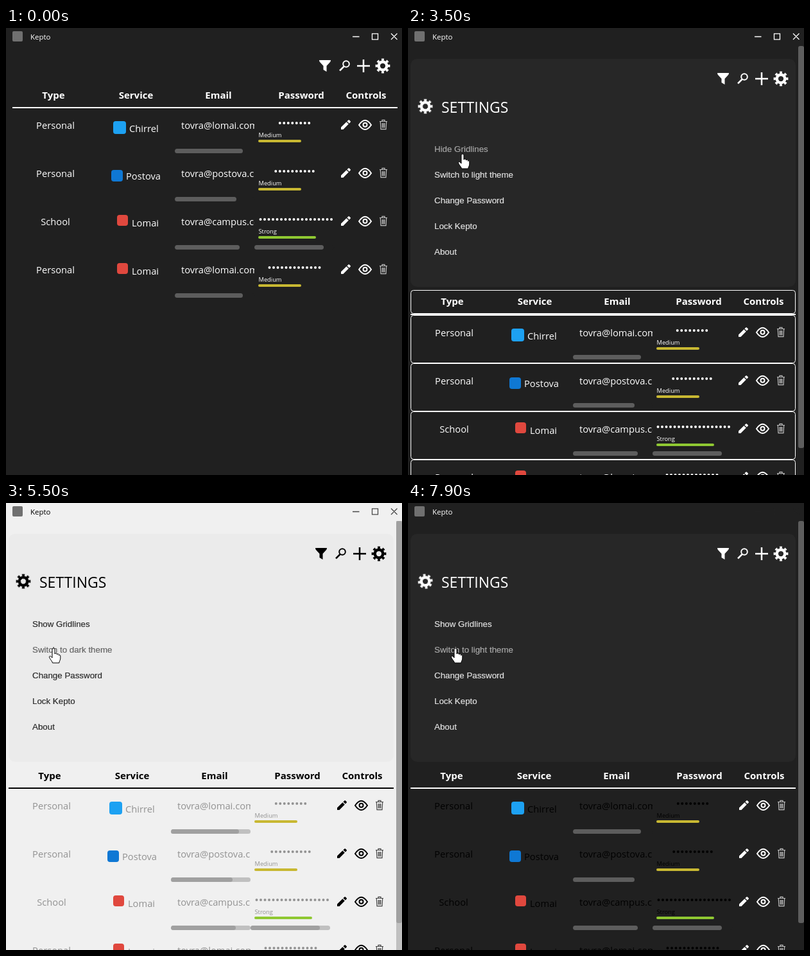
An HTML page for the animation above (8000 ms loop, 617 px wide and 696 px high).

```html
<!DOCTYPE html>
<html lang="en">
<head>
<meta charset="utf-8">
<title>Password manager</title>
<style>
@property --bg { syntax: "<color>"; inherits: true; initial-value: #202020; }
@property --panel { syntax: "<color>"; inherits: true; initial-value: #272727; }
@property --ink { syntax: "<color>"; inherits: true; initial-value: #fff; }
@property --menu { syntax: "<color>"; inherits: true; initial-value: #e2e2e2; }
@property --head { syntax: "<color>"; inherits: true; initial-value: #fff; }
@property --ctl { syntax: "<color>"; inherits: true; initial-value: #fff; }
@property --row { syntax: "<color>"; inherits: true; initial-value: #fff; }
@property --track { syntax: "<color>"; inherits: true; initial-value: #202020; }
@property --thumb { syntax: "<color>"; inherits: true; initial-value: #5d5d5d; }
@property --light { syntax: "<number>"; inherits: true; initial-value: 0; }
@property --grid { syntax: "<number>"; inherits: true; initial-value: 0; }

:root {
  animation: theme 8s linear infinite, head 8s linear infinite, ctl 8s linear infinite,
    row 8s linear infinite, bars 8s linear infinite, grid 8s linear infinite;
}
html, body { margin: 0; width: 100%; height: 100%; overflow: hidden; background: var(--bg); }
body > svg { display: block; }
text { font-family: "Open Sans", "Noto Sans", sans-serif; white-space: pre; }

/* theme colours: icons first, then headings, then nested text */
@keyframes theme {
  0%, 52.5% { --bg: #202020; --panel: #272727; --ink: #fff; --menu: #e2e2e2; }
  55%, 85% { --bg: #f0f0f0; --panel: #ebebeb; --ink: #000; --menu: #2c2c2c; }
  87.5%, 100% { --bg: #202020; --panel: #272727; --ink: #fff; --menu: #e2e2e2; }
}
@keyframes head {
  0%, 57.5% { --head: #fff; }
  62.5%, 90% { --head: #000; }
  95%, 100% { --head: #fff; }
}
@keyframes ctl {
  0%, 65.6% { --ctl: #fff; }
  70%, 98.1% { --ctl: #000; }
  100% { --ctl: #606060; }
}
@keyframes row {
  0%, 66.9% { --row: #fff; }
  71.25%, 100% { --row: #000; }
}
@keyframes bars {
  0%, 51.87% { --track: #202020; --thumb: #5d5d5d; --light: 0; }
  51.88%, 84.37% { --track: #c0c0c0; --thumb: #a0a0a0; --light: 1; }
  84.38%, 100% { --track: #202020; --thumb: #5d5d5d; --light: 0; }
}
@keyframes grid {
  0%, 21.87% { --grid: 0; }
  21.88%, 45% { --grid: 1; }
  45.01%, 100% { --grid: 0; }
}

/* settings panel opening */
.body { animation: slide 8s infinite; }
@keyframes slide {
  0%, 10% { transform: translate(6px, -320px); animation-timing-function: ease-out; }
  15.6%, 100% { transform: none; }
}
.tools { animation: tools 8s infinite; }
@keyframes tools {
  0%, 10% { transform: translate(6px, -20px); animation-timing-function: ease-out; }
  15.6%, 100% { transform: none; }
}
.panel { animation: show 8s linear infinite; }
@keyframes show {
  0%, 10% { opacity: 0; }
  14%, 100% { opacity: 1; }
}
.page { animation: page 8s linear infinite; }
@keyframes page {
  0%, 9.99% { opacity: 0; }
  10%, 100% { opacity: 1; }
}
.spin { animation: spin 4s linear infinite; }
@keyframes spin { to { transform: rotate(360deg); } }

/* menu entries */
.menu text { font: 13.333px "Liberation Sans", Arial, sans-serif; fill: var(--menu); stroke: var(--menu); stroke-width: .2px; }
.item { transform-box: fill-box; transform-origin: center; }
.one { animation: hover1 8s linear infinite, press1 8s linear infinite; }
.two { animation: hover2 8s linear infinite, press2 8s linear infinite; }
@keyframes hover1 {
  0%, 19% { opacity: 1; }
  19.8%, 28% { opacity: .68; }
  29%, 42% { opacity: 1; }
  42.8%, 47% { opacity: .68; }
  48.5%, 100% { opacity: 1; }
}
@keyframes hover2 {
  0%, 49% { opacity: 1; }
  50.5%, 100% { opacity: .7; }
}
@keyframes press1 {
  0%, 21.5% { transform: none; }
  22%, 22.5% { transform: scale(.95); }
  24.6%, 44.5% { transform: none; }
  45%, 45.5% { transform: scale(.95); }
  47.5%, 100% { transform: none; }
}
@keyframes press2 {
  0%, 51% { transform: none; }
  51.6%, 52.6% { transform: scale(.95); }
  54.8%, 83.8% { transform: none; }
  84.4%, 85.1% { transform: scale(.95); }
  87.5%, 100% { transform: none; }
}
.gridOn, .lines { opacity: var(--grid); }
.gridOff { opacity: calc(1 - var(--grid)); }
.lightOn { opacity: var(--light); }
.lightOff { opacity: calc(1 - var(--light)); }

/* table */
.title { font-size: 11.5px; fill: var(--head); }
.big { font-size: 23px; fill: var(--head); }
.th text { font-size: 15px; font-weight: 700; fill: var(--head); text-anchor: middle; }
.td { font-size: 14.7px; fill: var(--row); }
.small { font-size: 9.3px; fill: var(--row); }
.mid { text-anchor: middle; }
.dots { stroke: var(--row); stroke-width: 4; stroke-linecap: round; }
.track { fill: var(--track); }
.thumb { fill: var(--thumb); }
.rule { stroke: var(--ink); stroke-width: 2; transform: translateY(calc(var(--grid) * 2px)); }
.lines { fill: none; stroke: #fff; }
.headL { transform: translate(calc(var(--grid) * 1px), calc(var(--grid) * 1px)); }
.headR { transform: translate(calc(var(--grid) * -1px), calc(var(--grid) * 1px)); }
.left { transform: translate(calc(var(--grid) * 1px), calc(var(--grid) * 3px)); }
.cell { transform: translateY(calc(var(--grid) * 3px)); }
.right { transform: translate(calc(var(--grid) * -1px), calc(var(--grid) * 3px)); }
.scroll { transform: translateY(calc(var(--grid) * 1px)); }
.fill { fill: var(--ink); }
.line { fill: none; stroke: var(--ink); }
.win { fill: none; stroke: var(--ctl); stroke-width: 1.3; }

/* pointer */
.cursor { fill: #fff; stroke: #000; stroke-linejoin: round; animation: move 8s ease-in-out infinite; }
@keyframes move {
  0%, 1.2% { transform: translate(604px, 60px); }
  3.75%, 11% { transform: translate(594px, 61px); }
  20%, 21.5% { transform: translate(95px, 186px); }
  23.75%, 27.5% { transform: translate(94px, 184px); }
  32.5% { transform: translate(80px, 430px); }
  36% { transform: translate(146px, 500px); }
  39% { transform: translate(24px, 516px); }
  42.5% { transform: translate(86px, 200px); }
  43.75%, 46% { transform: translate(85px, 196px); }
  50.5%, 60% { transform: translate(73px, 226px); }
  65%, 100% { transform: translate(74px, 226px); }
}
.hand { animation: hand 8s step-end infinite; }
.arrow { animation: arrow 8s step-end infinite; }
@keyframes hand {
  0% { opacity: 0; }
  1.25% { opacity: 1; }
  11.6% { opacity: 0; }
  19% { opacity: 1; }
  29% { opacity: 0; }
  42% { opacity: 1; }
}
@keyframes arrow {
  0% { opacity: 0; }
  11.6% { opacity: 1; }
  19% { opacity: 0; }
  29% { opacity: 1; }
  42% { opacity: 0; }
}
</style>
</head>
<body>
<svg width="617" height="696" viewBox="0 0 617 696">
  <defs>
    <g id="gear" class="line">
      <circle r="6.3" stroke-width="4.4"/>
      <circle r="9.6" stroke-width="3.6" pathLength="16" stroke-dasharray="1 1" stroke-dashoffset=".5"/>
    </g>
    <g id="controls">
      <path class="fill" d="M516 478v-3.4l8.4-8.4 3.4 3.4-8.4 8.4zM525.4 465.2l1.9-1.8q.8-.7 1.6 0l1.7 1.7q.8.8 0 1.6l-1.8 1.9z"/>
      <path class="line" stroke-width="2" d="M544 471Q553.500 456.500 563 471Q553.500 485 544 471z"/>
      <circle class="line" stroke-width="2" cx="553.500" cy="470.700" r="3"/>
      <path class="line" opacity=".72" stroke-width="1.200" d="M576 465.500h12M580 465v-1.700h4v1.700M577.300 466l.7 11.700h8l.7-11.700M580.200 468v7.500M582 468v7.500M583.800 468v7.500"/>
    </g>
  </defs>

  <g class="body">
    <g class="panel">
      <rect x="4" y="48" width="600" height="355" rx="10" fill="var(--panel)"/>
      <g transform="translate(27 122)"><g class="spin"><use href="#gear"/></g></g>
      <text class="big" x="52" y="131.500">SETTINGS</text>
      <g class="menu">
        <g class="item one">
          <text class="gridOff" x="41" y="193">Show Gridlines</text>
          <text class="gridOn" x="41" y="193">Hide Gridlines</text>
        </g>
        <g class="item two">
          <text class="lightOff" x="41" y="233">Switch to light theme</text>
          <text class="lightOn" x="41" y="233">Switch to dark theme</text>
        </g>
        <text x="41" y="273">Change Password</text>
        <text x="41" y="313">Lock Kepto</text>
        <text x="41" y="353">About</text>
      </g>
    </g>
    <g class="th">
      <text class="headL" x="68" y="430">Type</text>
      <text class="headL" x="196.500" y="430">Service</text>
      <text class="headL" x="325" y="430">Email</text>
      <text class="headR" x="454" y="430">Password</text>
      <text class="headR" x="555" y="430">Controls</text>
    </g>
    <path class="rule" d="M4 444H604"/>
    <rect class="lines" x="4.500" y="408.500" width="599" height="36" rx="4"/>
    <g id="rows"></g>
  </g>

  <g class="tools">
    <path class="fill" d="M482 70h18q0 2-1 3l-5.500 6v9l-5-3v-6l-5.500-6q-1-1-1-3z"/>
    <circle class="line" stroke-width="2" cx="524" cy="76" r="4.800"/>
    <path class="line" stroke-width="2.600" d="M520.500 79.800l-6.500 6.500"/>
    <path class="line" stroke-width="2.500" d="M541 79h20M551 69v20"/>
    <use href="#gear" x="581" y="79"/>
  </g>

  <g class="page">
    <rect class="track" x="608" y="28" width="9" height="668"/>
    <rect class="thumb" x="608" y="28" width="9" height="626" rx="3"/>
  </g>

  <rect x="10" y="5" width="16" height="16" rx="2" fill="#707070"/>
  <text class="title" x="38" y="18">Kepto</text>
  <path class="win" d="M540 13.500h10.500M570.500 8.800h9v9h-9zM600 8.500l9.500 9.500M609.500 8.500L600 18"/>

  <g class="cursor">
    <path class="hand" d="M-2 14V2a2 2 0 0 1 4 0V9c0-1.500 3.500-1.500 3.500 0v1c0-1.300 3-1.300 3 .3v1c.2-1 2.300-1 2.300.6V16c0 3-2 4-2 7H-1.500c0-2.500-4.500-6-5-9c-.3-2 2-2.500 4.500 1z"/>
    <path class="arrow" d="M0 0V16l4-4 2.500 6 2.500-1-2.500-6H12z"/>
  </g>
</svg>
<script>
const services = {
  Chirrel: { color: "#1da1f2", x: 161, y: 465, size: 20, textX: 186, textY: 481.5 },
  Postova: { color: "#0f78d4", x: 158, y: 466, size: 18, textX: 181, textY: 480.5 },
  Lomai: { color: "#e0483e", x: 167, y: 461, size: 17, textX: 190, textY: 478.5 }
};
const levels = {
  Medium: { color: "#c8b832", width: 67 },
  Strong: { color: "#8fc832", width: 90 }
};
const entries = [
  { type: "Personal", service: "Chirrel", email: "tovra@lomai.com", thumb: 106, dots: 8, level: "Medium" },
  { type: "Personal", service: "Postova", email: "tovra@postova.com", thumb: 96, dots: 10, level: "Medium" },
  { type: "School", service: "Lomai", email: "tovra@campus.com", thumb: 101, dots: 18, level: "Strong", wide: 108 },
  { type: "Personal", service: "Lomai", email: "tovra@lomai.com", thumb: 106, dots: 13, level: "Medium" }
];
const pitch = 6.5;

const scrollbar = (x, width) => `<g class="scroll">
  <rect class="track" x="${x}" y="508" width="124" height="7" rx="3.5"/>
  <rect class="thumb" x="${x}" y="508" width="${width}" height="7" rx="3.5"/></g>`;

function entryRow(e, i) {
  const s = services[e.service], l = levels[e.level];
  const span = (e.dots - 1) * pitch;
  const dotX = Math.max(390.5, 443.5 - span / 2);
  return `<g transform="translate(0 ${i * 75})">
    <rect class="lines" x="4.5" y="447.5" width="599" height="74" rx="4"/>
    <text class="td mid left" x="71" y="476.5">${e.type}</text>
    <g class="cell">
      <rect x="${s.x}" y="${s.y}" width="${s.size}" height="${s.size}" rx="4" fill="${s.color}"/>
      <text class="td" x="${s.textX}" y="${s.textY}">${e.service}</text>
      <svg x="257" y="450" width="124" height="50" overflow="hidden">
        <text class="td" x="10" y="26.5">${e.email}</text>
      </svg>
      <text class="small" x="387.5" y="490">${e.level}</text>
      <rect x="387" y="494" width="${l.width}" height="4" rx="2" fill="${l.color}"/>
    </g>
    <g class="right">
      <path class="dots" stroke-dasharray="0 ${pitch}" d="M${dotX} 468h${span + .1}"/>
      <use href="#controls"/>
    </g>
    ${scrollbar(257, e.thumb)}${e.wide ? scrollbar(381, e.wide) : ""}
  </g>`;
}
document.getElementById("rows").innerHTML = entries.map(entryRow).join("");
</script>
</body>
</html>
```
